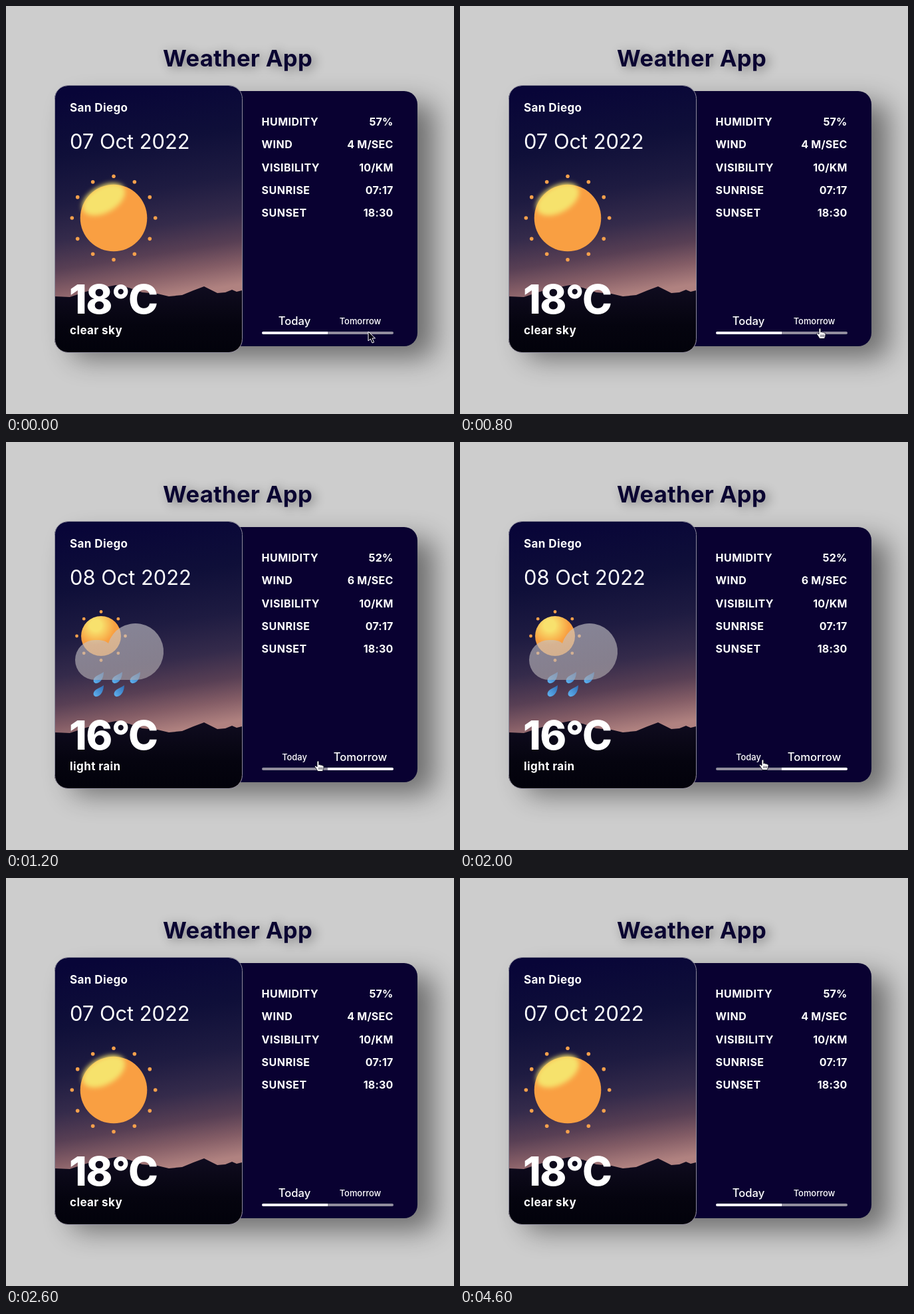
Animation, 674 px wide and 614 px high, one loop 4.7 s. Source, as an HTML page:

```html
<!DOCTYPE html>
<html lang="en">
<head>
<meta charset="utf-8">
<title>Weather App</title>
<style>
html, body { margin: 0; width: 100%; height: 100%; overflow: hidden; background: #cdcdcd; }
svg { display: block; width: 674px; height: 614px; font-family: Inter, sans-serif; fill: #fff; }
.bold { font-weight: 700; font-size: 17px; letter-spacing: .4px; }
.title { font-weight: 700; font-size: 34.6px; fill: #0a0431; letter-spacing: .3px; filter: drop-shadow(5px 3px 8px #0006); }
.shadow { filter: drop-shadow(25px 18px 20px #0007); }
.row { font-weight: 700; font-size: 16px; letter-spacing: .5px; }
.value { letter-spacing: .2px; text-anchor: end; }
.tab { text-anchor: middle; font-weight: 500; }
</style>
</head>
<body>
<svg viewBox="0 0 674 614">
  <defs>
    <linearGradient id="sky" gradientUnits="userSpaceOnUse" x1="180" y1="118" x2="230" y2="438">
      <stop offset="0" stop-color="#080538"/>
      <stop offset=".28" stop-color="#0f0f39"/>
      <stop offset=".5" stop-color="#1e1b41"/>
      <stop offset=".67" stop-color="#352b4b"/>
      <stop offset=".8" stop-color="#583f54"/>
      <stop offset=".9" stop-color="#845d66"/>
      <stop offset="1" stop-color="#b08280"/>
    </linearGradient>
    <linearGradient id="hill" x1="0" y1="0" x2="0" y2="1">
      <stop offset="0" stop-color="#100c20"/>
      <stop offset=".6" stop-color="#05040f"/>
      <stop offset="1" stop-color="#02020b"/>
    </linearGradient>
    <linearGradient id="cloud" x1=".3" y1="0" x2=".6" y2="1">
      <stop offset="0" stop-color="#cac8cd"/>
      <stop offset="1" stop-color="#b2adb0"/>
    </linearGradient>
    <radialGradient id="smallSun" gradientUnits="userSpaceOnUse" cx="135" cy="276" r="34">
      <stop offset=".25" stop-color="#f8e16d"/>
      <stop offset=".85" stop-color="#f89f41"/>
    </radialGradient>
    <linearGradient id="water" x1="1" y1="0" x2="0" y2="1">
      <stop offset="0" stop-color="#2f6cb4"/>
      <stop offset="1" stop-color="#62b5f2"/>
    </linearGradient>
    <filter id="soft" x="-30%" y="-40%" width="160%" height="180%"><feGaussianBlur stdDeviation="3.5"/></filter>
    <clipPath id="frame"><rect x="73" y="120" width="282" height="401" rx="20"/></clipPath>
    <path id="drop" d="M8-9C8-1 4 7-2 8C-7 9-9 4-6 0C-3-4 3-5 8-9Z" fill="url(#water)"/>
  </defs>

  <text class="title" x="236" y="91">Weather App</text>

  <rect class="shadow" x="73" y="128" width="546" height="384" rx="20" fill="#090131"/>
  <g clip-path="url(#frame)">
    <rect x="73" y="120" width="282" height="401" fill="url(#sky)"/>
    <path fill="url(#hill)" d="M73 437L96 438L120 430L145 424L165 420L185 424L205 431L228 433L245 437L265 435L282 428L298 422L308 427L318 432L330 431L340 427L347 430L355 428V521H73Z"/>
  </g>
  <rect x="73.5" y="119.5" width="282" height="402" rx="20" fill="none" stroke="#8d8b9b"/>

  <g id="clear">
    <circle cx="162" cy="319" r="50.3" fill="#f99f42"/>
    <ellipse cx="147" cy="291" rx="35" ry="20" fill="#f6e26c" transform="rotate(-29 147 291)" filter="url(#soft)"/>
  </g>
  <g id="rain">
    <circle cx="143" cy="292" r="30" fill="url(#smallSun)"/>
    <use href="#drop" x="139" y="355"/>
    <use href="#drop" x="167" y="355"/>
    <use href="#drop" x="194" y="355"/>
    <use href="#drop" x="139" y="375"/>
    <use href="#drop" x="170" y="375"/>
  </g>

  <text class="bold" x="96" y="159">San Diego</text>
  <text id="date" x="96" y="215" font-size="30.8"></text>
  <text id="temp" x="95" y="463" font-size="60.5" font-weight="800" letter-spacing="-1.5"></text>
  <text id="summary" class="bold" x="96" y="494"></text>

  <g id="rows"></g>

  <text id="tab0" class="tab" x="434"></text>
  <text id="tab1" class="tab" x="533"></text>
  <path id="bar0" d="M484 490H387a2 2 0 0 0 0 4H484Z"/>
  <path id="bar1" d="M484 490H581a2 2 0 0 1 0 4H484Z"/>

  <path id="arrow" d="M0 0V14L3.3 11L6 17L8.6 16L6 10H10.5Z" fill="#050314" stroke="#fff"/>
  <g id="hand" stroke="#050314" stroke-width=".8">
    <path d="M-1 9V1Q.2-1 1.8 1V6Q3.5 4.5 4.4 6.4Q6 5.4 6.8 7Q9 6.4 9 8.5Q9 12 7.3 15.5H0Q-2 12-4.5 8.5Q-4 6-1 9Z"/>
    <path d="M2 9.5V13M4.2 9.5V13M6.4 9.5V13"/>
  </g>
</svg>
<script>
const LOOP = 4700, STEP = 100, SWITCH = 900, BACK = 2100, TAB_BOTTOM = 490;
const $ = id => document.getElementById(id);

const add = (parent, tag, attrs, text = '') => {
  const el = document.createElementNS('http://www.w3.org/2000/svg', tag);
  for (const key in attrs) el.setAttribute(key, attrs[key]);
  el.textContent = text;
  parent.append(el);
  return el;
};

const days = [
  { date: '07 Oct 2022', temp: '18°C', summary: 'clear sky', values: ['57%', '4 M/SEC', '10/KM', '07:17', '18:30'] },
  { date: '08 Oct 2022', temp: '16°C', summary: 'light rain', values: ['52%', '6 M/SEC', '10/KM', '07:17', '18:30'] }
];

const cells = ['HUMIDITY', 'WIND', 'VISIBILITY', 'SUNRISE', 'SUNSET'].map((label, i) => {
  const y = 180 + i * 34.3;
  add($('rows'), 'text', { class: 'row', x: 384.5, y }, label);
  return add($('rows'), 'text', { class: 'row value', x: 582.5, y });
});

const rays = (parent, cx, cy, radius, count, r) => {
  for (let i = 0; i < count; i++) {
    const a = i / count * 2 * Math.PI;
    add(parent, 'circle', { cx: cx + radius * Math.cos(a), cy: cy + radius * Math.sin(a), r, fill: '#f5a04c' });
  }
};
rays($('clear'), 162, 319, 62.7, 12, 2.8);
rays($('rain'), 143, 292, 36.5, 8, 2.4);
add($('rain'), 'path', {
  d: 'M134 358a30 30 0 0 1 0-60c8 0 14 0 20 5A42.5 42.5 0 1 1 196 358Z',
  fill: 'url(#cloud)', 'fill-opacity': .62
});

// Pointer path: time, x, y
const path = [[0, 545, 490], [300, 541, 485], [900, 541, 485], [1200, 469, 480], [1400, 455, 478],
  [2200, 455, 478], [2400, 452, 498], [2500, 448, 580], [2600, 444, 640], [LOOP, 444, 640]];

const pointer = t => {
  const i = path.findIndex(p => p[0] > t);
  const [t0, x0, y0] = path[i - 1], [t1, x1, y1] = path[i];
  const k = (t - t0) / (t1 - t0);
  return [x0 + (x1 - x0) * k, y0 + (y1 - y0) * k];
};

const show = (id, on) => $(id).style.display = on ? '' : 'none';

let shown = -1;
const showDay = n => {
  if (n === shown) return;
  shown = n;
  const day = days[n];
  for (const id of ['date', 'temp', 'summary']) $(id).textContent = day[id];
  cells.forEach((cell, i) => cell.textContent = day.values[i]);
  show('clear', n === 0);
  show('rain', n === 1);
  ['Today', 'Tomorrow'].forEach((name, i) => {
    const tab = $('tab' + i), active = i === n;
    tab.textContent = name;
    tab.setAttribute('font-size', active ? 16.6 : 12.9);
    tab.setAttribute('y', active ? 480 : 479);
    $('bar' + i).setAttribute('fill', active ? '#fff' : '#918e9d');
  });
};

const draw = now => {
  const t = Math.floor(now % LOOP / STEP) * STEP;
  showDay(t >= SWITCH && t < BACK ? 1 : 0);
  const [x, y] = pointer(t), onTab = y < TAB_BOTTOM;
  show('arrow', !onTab);
  show('hand', onTab);
  for (const id of ['arrow', 'hand']) $(id).setAttribute('transform', `translate(${x} ${y})`);
};

const start = performance.now();
const tick = () => {
  draw(performance.now() - start);
  requestAnimationFrame(tick);
};
tick();
</script>
</body>
</html>
```
